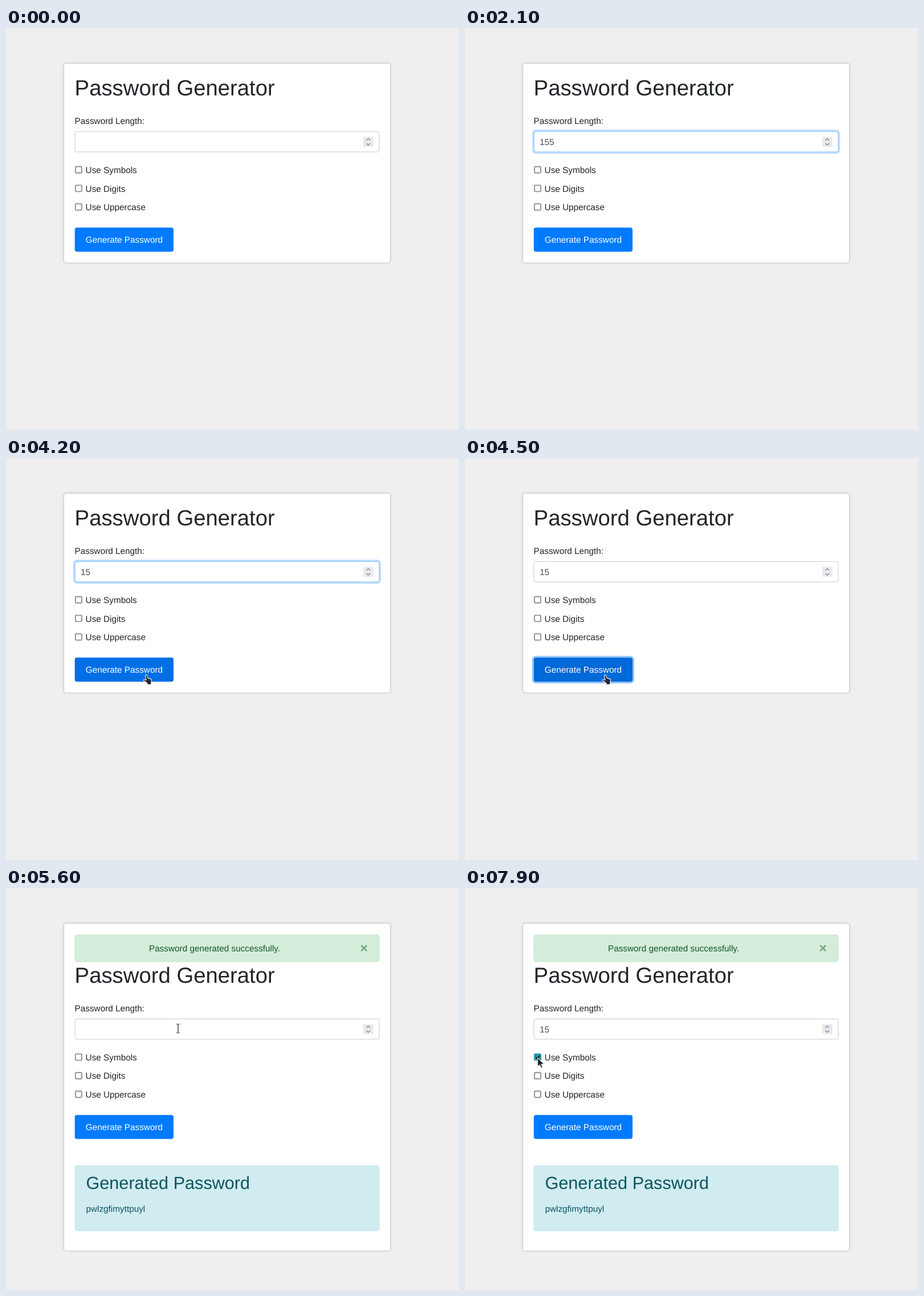
These frames come from a looping animation (795 px wide and 704 px high, 8000 ms). An HTML page:

```html
<!DOCTYPE html>
<html lang="en">
<head>
<meta charset="utf-8">
<title>Password Generator</title>
<style>
  html, body { margin: 0; width: 100%; height: 100%; overflow: hidden; background: #efefef; }
  svg { display: block; width: 795px; height: 704px; }
  text { font: 15.31px "Liberation Sans", Arial, sans-serif; fill: #212529; text-rendering: geometricPrecision; white-space: pre; }
  .h1 { font-size: 38.3px; }
  .h2 { font-size: 30.62px; }
  .info { fill: #0c5460; }
  .tip { font-size: 12.6px; fill: #fff; }
</style>
</head>
<body>
<svg viewBox="0 0 795 704">
  <defs>
    <filter id="soft" x="-10%" y="-10%" width="120%" height="120%"><feGaussianBlur stdDeviation="2.4"/></filter>
  </defs>
  <rect width="795" height="704" fill="#efefef"/>
  <rect class="card" x="101" y="61.5" width="574" rx="4.8" opacity=".13" filter="url(#soft)"/>
  <rect class="card" x="101.5" y="62" width="573" rx="4.3" fill="#fff" stroke="#ccc"/>

  <g id="result">
    <rect x="121" y="82" width="534" height="47" rx="3.4" fill="#d4edda" stroke="#c3e6cb"/>
    <text x="251" y="111" style="fill:#155724">Password generated successfully.</text>
    <text x="621.6" y="113.2" style="font-size:23px;font-weight:700;fill:#155724" opacity=".5">×</text>
    <rect x="121" y="486.3" width="534" height="114" rx="3.4" fill="#d1ecf1" stroke="#bee5eb"/>
    <text class="h2 info" x="140.5" y="527">Generated Password</text>
    <text class="info" x="140.5" y="567">pwlzgfimyttpuyl</text>
  </g>

  <g id="form">
    <text class="h1" x="120.6" y="118">Password Generator</text>
    <text x="120.6" y="168">Password Length:</text>
    <rect id="ring" x="119.4" y="179.6" width="537.2" height="39" rx="5" fill="none" stroke="#bfdeff" stroke-width="3.2"/>
    <rect id="field" x="121" y="181.3" width="534" height="35.7" rx="3.4" fill="#fff"/>
    <rect x="627" y="190.6" width="17.6" height="17.4" fill="#e9e9ed"/>
    <path d="M632.4 196.8l3.4-3.1 3.4 3.1M632.4 201.9l3.4 3.1 3.4-3.1" fill="none" stroke="#85858f" stroke-width="1.3"/>
    <text id="value" x="130.9" y="205" style="fill:#495057"></text>
    <rect id="caret" y="191" width="1" height="18" fill="#343a40"/>
    <g id="options"></g>
    <rect id="press" x="119.2" y="348" width="176.2" height="45.2" rx="5" fill="none" stroke="#268fff" stroke-opacity=".5" stroke-width="3"/>
    <rect id="button" x="120.7" y="349.6" width="173.3" height="42.1" rx="3.8"/>
    <text x="139.8" y="376.4" style="fill:#fff">Generate Password</text>
  </g>

  <g id="tip">
    <rect x="260" y="215" width="158" height="44" rx="4" fill="#2d2d2d"/>
    <text class="tip" x="339" y="241.3" text-anchor="middle">Please fill out this field.</text>
  </g>

  <g id="pointer" stroke-linejoin="round">
    <path id="arrow" d="M0 0V15.2L3.7 12L6.2 17.7L8.9 16.5L6.5 11H11.5Z" fill="#24262b" stroke="#fff" stroke-width="1"/>
    <g id="beam" fill="none">
      <path d="M-3-7.5H3M-3 7.5H3M0-7.5V7.5" stroke="#fff" stroke-width="3" stroke-opacity=".8"/>
      <path d="M-2.6-7.5H-.6M.6-7.5H2.6M-2.6 7.5H-.6M.6 7.5H2.6M0-6.8V6.8" stroke="#2c2c30" stroke-width="1.3"/>
    </g>
    <path id="hand" d="M.6 1.6C.2-.4 3-.9 3.7 1.2L5.2 5.6L9.5 6.6C11 7 11.4 8 11.3 9.2L10.9 13V16.7H3.8V14.2L-2.3 9.9C-3.6 8.6-2 7.3-.6 7.9L2.1 9Z" fill="#24262b" stroke="#fff" stroke-width="1.1"/>
  </g>
</svg>
<script>
const LOOP = 8000, STEP = 100, DROP = 47.85, RELOAD = 4600;
const $ = id => document.getElementById(id);
const show = (id, on) => $(id).setAttribute('display', on ? 'inline' : 'none');
const within = (t, a, b) => t >= a && t < b;
const clamp = v => Math.max(0, Math.min(1, v));
const mix = (a, b, p) => a + (b - a) * p;
const blend = (a, b, p) => `rgb(${a.map((v, i) => Math.round(mix(v, b[i], p)))})`;

// latest entry whose time has come
const latest = (list, t) => list.filter(e => e[0] <= t).pop();

const typed = [[0, ''], [1900, '1'], [2000, '15'], [2100, '155'], [3100, '15'], [4600, ''], [6500, '1'], [6600, '15']];
const focus = [[0, 0], [1000, .5], [1100, 1], [4300, .5], [4400, 0], [5700, .5], [5800, 1], [7700, .5], [7800, 0]];
const caretOn = [[1000, 2100], [3100, 3500], [5700, 6900]];
const hidden = [[0, 200], [1900, 3700], [6500, 7100]];
// start, end, from, to
const moves = [
  [200, 700, [146, 2], [258.3, 195]],
  [3700, 4200, [258.3, 195], [244, 380]],
  [5100, 5600, [244, 380], [302, 246]],
  [7100, 7500, [138, 341], [127.3, 297.6]]
];
const labels = ['Use Symbols', 'Use Digits', 'Use Uppercase'];
const rowY = i => 248.2 + i * 32.55;

$('options').innerHTML = labels.map((label, i) => {
  const y = rowY(i);
  return `<rect class="box" x="121.9" y="${y - 5.4}" width="11" height="11" rx="1.2" stroke-width="1.9"/>
    <text x="139.6" y="${y + 5.8}">${label}</text>`;
}).join('') +
  `<path id="tick" d="M124 ${rowY(0) + .2}l2.5 2.7 4.7-5.4" fill="none" stroke="#101418" stroke-width="2"/>`;

function pointerAt(t) {
  const [start, end, a, b] = latest(moves, t) || moves[0];
  const p = clamp((t - start) / (end - start));
  const e = p * p * (3 - 2 * p);
  return [mix(a[0], b[0], e), mix(a[1], b[1], e)];
}

function shapeAt(x, y) {
  const over = (l, r, top, bottom) => within(x, l, r) && within(y, top, bottom);
  if (over(121, 294, 350, 392)) return 'hand';
  if (over(121, 472, 84, 126) || over(121, 626, 181, 217)) return 'beam';
  return 'arrow';
}

function draw(now) {
  const t = Math.floor(now % LOOP / STEP) * STEP;
  const done = t >= RELOAD, shift = done ? DROP : 0;
  const height = done ? 573.5 : 349.3;

  document.querySelectorAll('.card').forEach(c => c.setAttribute('height', height));
  $('form').setAttribute('transform', `translate(0 ${shift})`);
  show('result', done);
  show('tip', within(t, 1600, 1900));

  const f = latest(focus, t)[1], text = latest(typed, t)[1];
  $('ring').setAttribute('opacity', f);
  $('field').setAttribute('stroke', blend([200, 203, 207], [128, 189, 255], f));
  $('value').textContent = text;
  $('caret').setAttribute('x', 131 + Math.floor(text.length * 8.52));
  show('caret', caretOn.some(([a, b]) => within(t, a, b)));

  const [x, y] = pointerAt(t), visible = !hidden.some(([a, b]) => within(t, a, b));
  const shape = shapeAt(x, y - shift);
  show('pointer', visible);
  $('pointer').setAttribute('transform', `translate(${x} ${y})`);
  ['arrow', 'beam', 'hand'].forEach(id => show(id, id === shape));

  const checked = t >= 7900;
  document.querySelectorAll('.box').forEach((box, i) => {
    const hover = visible && within(x, 121, 134) && Math.abs(y - shift - rowY(i)) < 8;
    const on = checked && i === 0;
    box.setAttribute('fill', on ? '#2b97a3' : '#fff');
    box.setAttribute('stroke', on ? '#2b97a3' : hover ? '#676774' : '#8f8f9d');
  });
  show('tick', checked);

  const pressed = within(t, 4300, RELOAD);
  const heat = !done && shape === 'hand' && visible ? (pressed ? 1 : .65) : 0;
  $('button').setAttribute('fill', blend([0, 123, 255], [0, 105, 217], heat));
  show('press', pressed);
  $('press').setAttribute('opacity', t < 4400 ? .5 : 1);
}

const begin = performance.now();
function tick() {
  draw(performance.now() - begin);
  requestAnimationFrame(tick);
}
tick();
</script>
</body>
</html>
```
